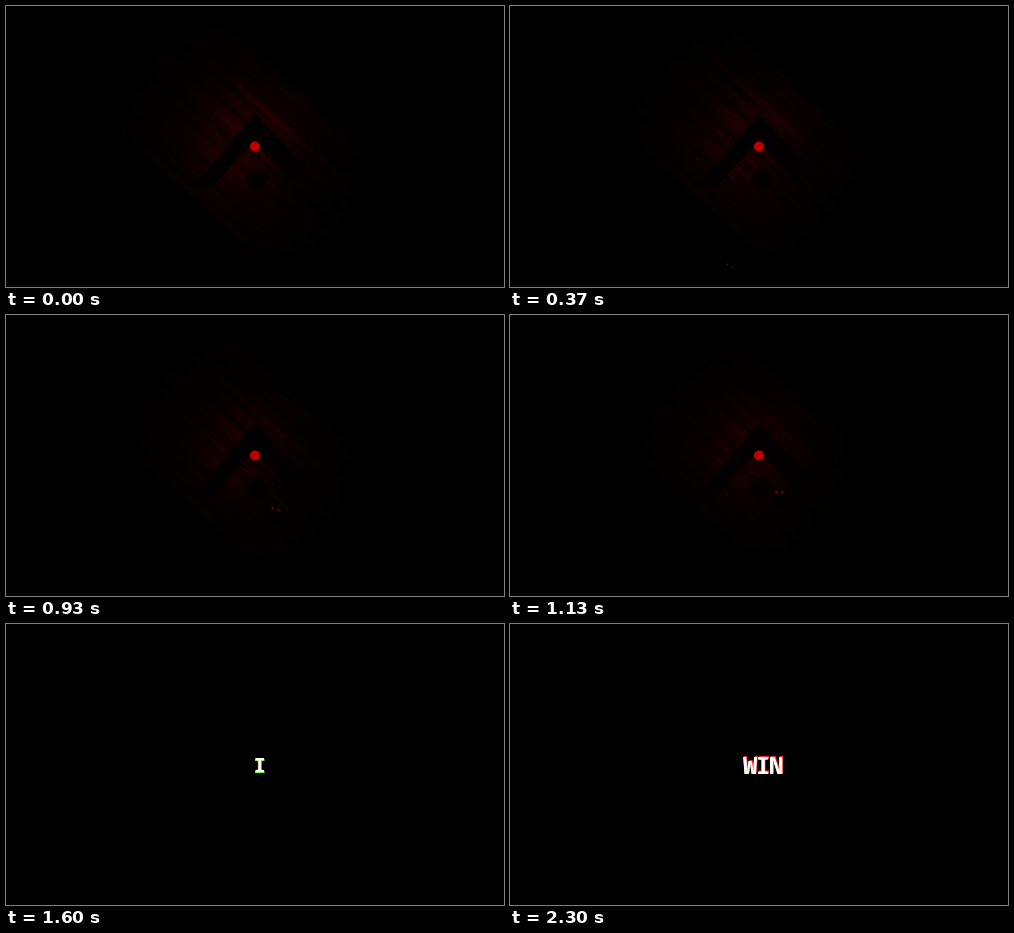
Animation, 498 px wide and 281 px high, one loop 2330 ms. Source, as an HTML page with a canvas:

```html
<!DOCTYPE html>
<html>
<head>
<meta charset="utf-8">
<style>
html, body { margin: 0; width: 100%; height: 100%; overflow: hidden; background: #000; }
canvas { display: block; }
</style>
</head>
<body>
<canvas id="stage" width="498" height="281"></canvas>
<script>
const ctx = document.getElementById('stage').getContext('2d');
const LOOP = 2330, WORD_I = 1600, WORD_WIN = 2130;
const rand = n => { const x = Math.sin(n * 127.1 + 11.7) * 43758.5453; return x - Math.floor(x); };
const mix = (a, b, k) => a + (b - a) * Math.max(0, Math.min(1, k));

// [time, x, y] of the point between the eyes
const path = [[0, 189, 304], [370, 220, 260], [530, 233, 243.5], [930, 269.5, 194], [1330, 269, 160], [1600, 259, 146]];

function along(t) {
  const i = Math.max(1, path.findIndex(p => p[0] > t));
  const [a, b] = [path[i - 1], path[i]], k = (t - a[0]) / (b[0] - a[0]);
  return [mix(a[1], b[1], k), mix(a[2], b[2], k)];
}

function polygon(points, color) {
  ctx.fillStyle = color;
  ctx.beginPath();
  points.forEach(p => ctx.lineTo(...p));
  ctx.fill();
}

function disc(x, y, r, color) {
  ctx.fillStyle = color;
  ctx.beginPath();
  ctx.arc(x, y, r, 0, 7);
  ctx.fill();
}

function floor(t) {
  const reach = t < 930 ? mix(138, 126, t / 930) : mix(126, 108, (t - 930) / 400);
  const power = t < 930 ? mix(1, .72, t / 930) : mix(.72, .85, (t - 930) / 400);
  ctx.save();
  ctx.translate(239, 137);
  ctx.rotate(.73);
  const light = ctx.createRadialGradient(0, 0, 4, 0, 0, reach);
  [[0, 52], [.18, 44], [.32, 25], [.5, 11], [.75, 5], [1, 0]]
    .forEach(([at, red]) => light.addColorStop(at, `rgb(${red * power},0,0)`));
  ctx.fillStyle = light;
  // planks
  for (let i = 0, v = -74; v < 72; i++) {
    const h = 2 + rand(i) * 5, half = reach * Math.sqrt(Math.max(.1, 1 - (v / 105) ** 2));
    ctx.globalAlpha = .45 + .5 * rand(i + 50) + .05 * Math.sin(t / 400 + i * 2);
    ctx.fillRect(-half * (.75 + .25 * rand(i + 90)), v, half * (1.6 + .4 * rand(i + 130)), h);
    v += h;
  }
  // dark streaks
  ctx.fillStyle = '#000';
  for (let i = 0; i < 46; i++) {
    ctx.globalAlpha = .3 + .45 * rand(i + 200);
    ctx.fillRect(-140 + 240 * rand(i + 300) + t / 150, -76 + 152 * rand(i + 400),
      20 + 60 * rand(i + 500), .8 + 2.4 * rand(i + 600) ** 2);
  }
  ctx.restore();
}

function room(t) {
  floor(t);
  polygon([[249, 108], [301, 160], [284, 177], [249, 134], [206, 181], [188, 180]], '#020000');
  polygon([[251, 161], [264, 173], [251, 186], [238, 174]], '#040000');
  const [x, y] = along(t);
  const lean = t < 930 ? 1.5 : mix(1, 0, (t - 930) / 200);
  const eyes = `rgb(${mix(60, 150, t / 1200)},0,0)`;
  disc(x + 1, y + 8, 7, '#010000');
  disc(x - 3, y - lean, 1, eyes);
  disc(x + 3, y + lean, 1, eyes);
  disc(249, 140.5, 5, '#c00000');
}

function word(text, size, x, fringes) {
  ctx.font = `bold ${size}px "Noto Sans Mono", "DejaVu Sans Mono", monospace`;
  ctx.letterSpacing = '-1.4px';
  ctx.textAlign = 'center';
  const draw = (color, dx, dy) => {
    ctx.fillStyle = color;
    ctx.fillText(text, x + dx, 141 + size * .357 + dy);
  };
  fringes.forEach(f => draw(...f));
  draw('#fff', 0, 0);
}

function frame(now) {
  const t = now % LOOP;
  ctx.fillStyle = '#000';
  ctx.fillRect(0, 0, 498, 281);
  if (t < WORD_I) room(t);
  else if (t < WORD_WIN) {
    const k = (t - WORD_I) / 300, d = Math.max(0, 1 - k) / 2;
    word('I', mix(20, 24, k), 253, [['#6f3', -d, d], ['#6f3', d, d], ['#f22', .5 - d, d - .5]]);
  } else {
    const d = Math.max(0, 1 - (t - WORD_WIN) / 170) / 2;
    word('WIN', 24, 252.6, [['#6f3', -d, d], ['#f22', .6, -.8]]);
  }
  requestAnimationFrame(frame);
}
requestAnimationFrame(frame);
</script>
</body>
</html>
```
